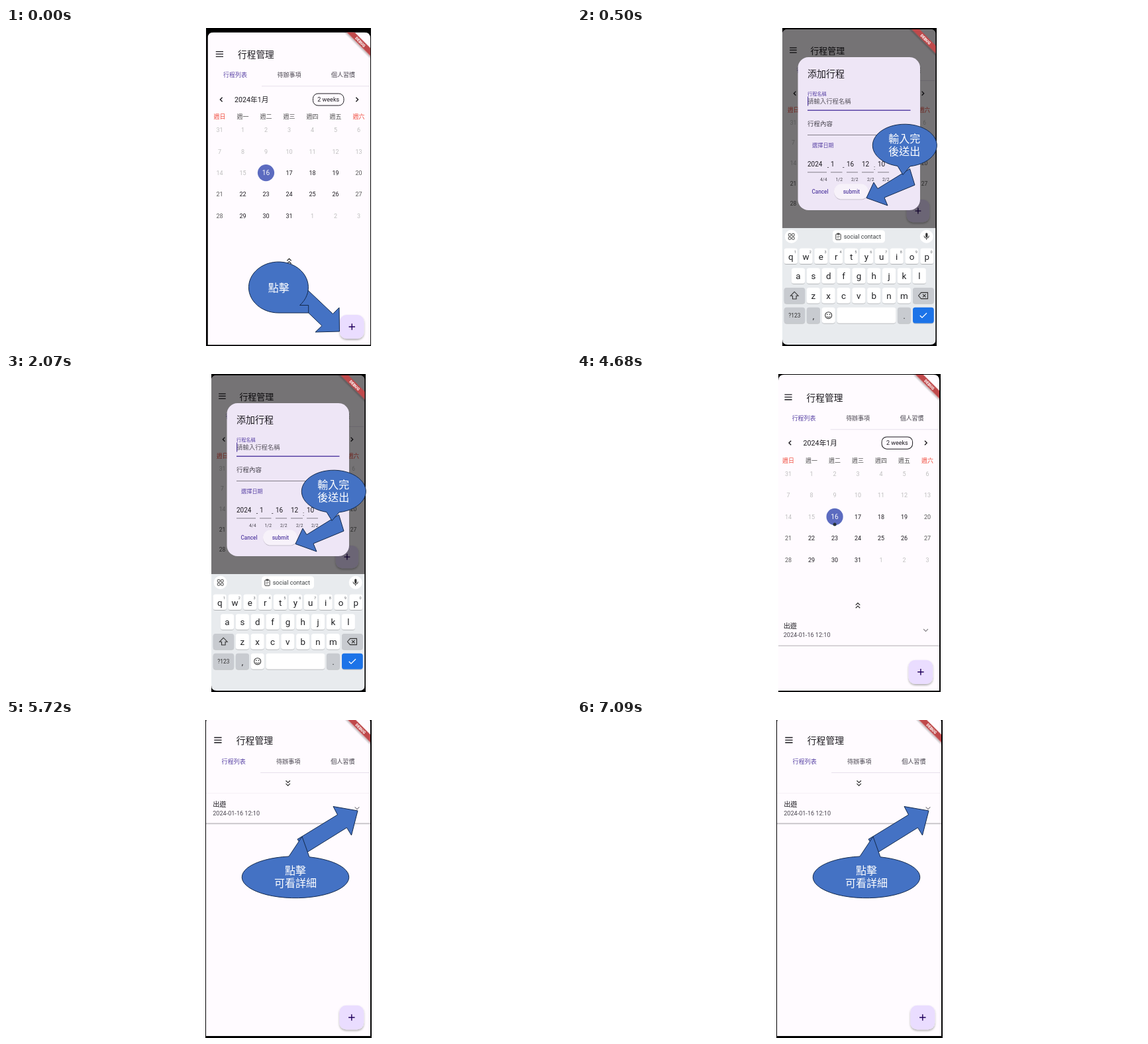
An HTML page that plays this animation: 853x480 px, repeating every 8 s.

```html
<!DOCTYPE html>
<html lang="zh-Hant">
<head>
<meta charset="utf-8">
<title>行程管理</title>
<style>
html, body { margin: 0; width: 100%; height: 100%; overflow: hidden; background: #fff; }
svg { display: block; width: 100%; height: 100%; font-family: Roboto, "Noto Sans CJK TC", "Noto Sans CJK JP", "Noto Sans CJK", sans-serif; }
.m { text-anchor: middle; }
.e { text-anchor: end; }
.call { fill: #4472c4; stroke: #142a4d; stroke-width: 1; }
</style>
</head>
<body>
<svg id="stage" viewBox="0 0 853 480">
  <defs>
    <filter id="soft" x="-30%" y="-30%" width="160%" height="170%">
      <feDropShadow dx="0" dy="1.8" stdDeviation="1.6" flood-opacity=".32"/>
    </filter>
    <filter id="thin" x="-10%" y="-10%" width="120%" height="130%">
      <feDropShadow dx="0" dy=".8" stdDeviation=".4" flood-opacity=".3"/>
    </filter>
  </defs>
</svg>
<script>
const INK = '#1d1b20', VIOLET = '#5b45a6', PAPER = '#fffbff', LOOP = 8000;

// Drawing helpers; text is centred vertically on y
const text = (x, y, s, size, fill = INK, cls = '', more = '') =>
  `<text x="${x}" y="${y + size * 0.37}" font-size="${size}" fill="${fill}" class="${cls}" ${more}>${s}</text>`;
const mid = (x, y, s, size, fill, more) => text(x, y, s, size, fill, 'm', more);
const box = (x, y, w, h, r, fill, more = '') =>
  `<rect x="${x}" y="${y}" width="${w}" height="${h}" rx="${r}" fill="${fill}" ${more}/>`;
const line = (d, color = INK, w = 1.3, more = '') =>
  `<path d="${d}" fill="none" stroke="${color}" stroke-width="${w}" ${more}/>`;
const rule = (x1, x2, y, color, w = 1) => line(`M${x1} ${y}H${x2}`, color, w);
const call = d => `<path class="call" d="${d}"/>`;
const chevron = (x, y, dir, color = INK) =>
  line(`M${x - dir * 1.6} ${y - 3.2}l${dir * 3.2} 3.2l${-dir * 3.2} 3.2`, color, 1.4);
const fold = (x, y, dir, color = '#333', r = 3.2, w = 1.3) =>
  line(`M${x - r} ${y + dir * r / 2}l${r} ${-dir * r}l${r} ${dir * r}`, color, w);
const folds = (x, y, dir) => fold(x, y - 2.2, dir) + fold(x, y + 2.2, dir);

function header() {
  const tabs = ['行程列表', '待辦事項', '個人習慣'];
  return [35.6, 39.4, 43.2].map(y => rule(316.8, 328, y, INK, 1.3)).join('') +
    text(350, 40, '行程管理', 13.7) +
    tabs.map((s, i) => mid(346 + i * 81.5, 71, s, 9, i ? '#49454f' : VIOLET)).join('') +
    rule(386, 549, 87.8, '#e7e0ec');
}

function calendar(marked) {
  let s = chevron(325, 108, -1) + text(345, 108, '2024年1月', 10.7) +
    box(463.5, 99, 46.5, 18, 7.5, 'none', `stroke="${INK}"`) +
    mid(486.7, 108, '2 weeks', 9) + chevron(530, 108, 1);
  for (let c = 0; c < 7; c++) {
    const x = 322.5 + c * 35, weekend = c % 6 === 0;
    s += mid(x, 134, '週' + '日一二三四五六'[c], 9, weekend ? '#f04a3c' : '#4f4f4f');
    for (let r = 0; r < 5; r++) {
      const n = r * 7 + c, y = 154 + r * 32.3;
      const day = n === 0 ? 31 : n > 31 ? n - 31 : n;
      if (n === 16) {
        s += `<circle cx="${x}" cy="${y}" r="12.6" fill="#5c6bc0"/>` + mid(x, y, day, 10.2, '#fafafa');
        if (marked) s += `<circle cx="${x}" cy="${y + 11.4}" r="2.5" fill="#263238"/>`;
      } else {
        s += mid(x, y, day, 9, n < 16 || n > 31 ? '#bfbfbf' : weekend ? '#5a5a5a' : INK);
      }
    }
  }
  return s;
}

const fab = y => box(504, y - 18, 36.5, 36, 10, '#eaddff', 'filter="url(#soft)"') +
  line(`M517.6 ${y}h9.4m-4.7 -4.7v9.4`, '#21005d', 1.4);

const banner = (x, y) => `<g transform="translate(${x} ${y}) rotate(45)">` +
  box(-30, 17.1, 60, 8.3, 0, '#c04a4c', 'filter="url(#soft)"') +
  mid(0, 21.2, 'DEBUG', 6, '#fff', 'font-weight="800"') + '</g>';

// Black surround with the screen clipped to its rounded outline
function phone(id, [bx, bw], [x, y, w, h, r], content) {
  return box(bx, 0, bw, 480, 0, '#000') +
    `<clipPath id="${id}"><path d="M${x} ${y + h}V${y + r}q0 ${-r} ${r} ${-r}h${w - 2 * r}q${r} 0 ${r} ${r}v${h - r}z"/></clipPath>` +
    `<g clip-path="url(#${id})">${box(x, y, w, h, 0, PAPER)}${content}</g>`;
}
const fit = (m, s) => `<g transform="matrix(${m})">${s}</g>`;

const entry = (x, y, cx) => text(x, y, '出遊', 10.2) +
  text(x, y + 13.3, '2024-01-16 12:10', 9.1, '#49454f') + fold(cx, y + 6, -1, '#8a878c', 3.4, 1.2);

function dialog() {
  const fields = [[348, 377, '2024', '4/4'], [383, 400.5, '1', '1/2'], [407, 424, '16', '2/2'],
    [430, 448, '12', '2/2'], [454, 471, '10', '2/2']];
  return box(333.5, 44, 184.5, 231, 16, '#eee6f6') +
    text(348, 69, '添加行程', 14) +
    text(348, 99.5, '行程名稱', 7.2, VIOLET) +
    text(348, 111, '請輸入行程名稱', 9.4, '#5d5963') +
    line('M348.6 103.5v14', VIOLET, 1.2) + rule(348, 503.5, 124.2, VIOLET, 1.4) +
    text(348, 144, '行程內容', 9.5, '#49454f') + rule(348, 503.5, 161.5, '#79747e', .9) +
    text(355, 177, '選擇日期', 8.2, VIOLET) +
    fields.map(([a, b, v, n]) => text(a, 205, v, 10) + rule(a, b, 217.8, '#79747e', .9) +
      text(b + .5, 228, n, 6.8, '#49454f', 'e')).join('') +
    mid(379, 210, '-', 9) + mid(402.3, 210, '-', 9) + mid(449, 211, ':', 9) +
    text(354.5, 246.8, 'Cancel', 8.2, VIOLET, '', 'font-weight="500"') +
    box(388, 235.3, 52, 23, 11.5, '#f7f2fa', 'filter="url(#thin)"') +
    mid(414.3, 246.8, 'submit', 8.2, VIOLET, 'font-weight="500"');
}

function keyboard() {
  const key = (x, y, w, fill = '#fff') => box(x, y, w, 23.6, 3.6, fill, 'filter="url(#thin)"');
  const GREY = '#c8cbd0', STEP = 22.85, DARK = '#202124';
  const rows = [['qwertyuiop', 322.7, 332.5], ['asdfghjkl', 334, 362.2], ['zxcvbnm', 356.8, 392]];
  let s = '<path d="M310 302H541.5V470q0 8 -8 8H318q-8 0 -8 -8z" fill="#e8ebee"/>' +
    '<circle cx="323.7" cy="314.8" r="10" fill="#fff"/><circle cx="527.7" cy="314.8" r="10" fill="#fff"/>' +
    box(386, 305.3, 79, 19, 4.5, '#fff') + text(402.7, 314.8, 'social contact', 9, '#3c4043');
  for (const i of [0, 1, 2, 3])
    s += box(319.3 + i % 2 * 5.2, 310.4 + (i >> 1) * 5.2, 3.6, 3.6, .8, 'none', 'stroke="#444" stroke-width="1"');
  s += box(390.8, 311, 7.4, 8.6, 1, 'none', 'stroke="#444"') + box(392.6, 309.6, 3.8, 2.6, .6, '#444') +
    line('M392.6 314.4h4m-4 2.4h2.8', '#444', .8) +
    box(526.2, 309.2, 3.2, 6.8, 1.6, '#333') + line('M524 313.6a3.7 3.7 0 0 0 7.4 0M527.7 317.3v2.4', '#333', 1);
  rows.forEach(([letters, x0, y], r) => [...letters].forEach((ch, i) => {
    const x = x0 + i * STEP;
    s += key(x - 10.1, y, 20.2) + mid(x, y + 12.2, ch, 13.4, DARK);
    if (!r) s += mid(x + 6.8, y + 5, (i + 1) % 10, 5.6, '#5f6368');
  }));
  s += key(312.7, 392, 31.5, GREY) + key(507, 392, 31.7, GREY) +
    line('M328.3 398.2l-5.8 6h3v4.8h5.6v-4.8h3z', '#333', 1.1) +
    line('M515.5 404l4 -4.6h10v9.2h-10zM522 401.8l4.6 4.6m0 -4.6l-4.6 4.6', '#333', 1.1);
  s += key(312.7, 421.8, 31.5, GREY) + mid(328.4, 434, '?123', 8.4, '#333') +
    key(346.8, 421.8, 20.2, GREY) + mid(356.9, 435, ',', 12, DARK) +
    key(369.6, 421.8, 20.2) + key(392.4, 421.8, 89) +
    key(483.9, 421.8, 20.2, GREY) + mid(494, 435, '.', 12, DARK) +
    key(507, 421.8, 31.7, '#1a73e8') + line('M517.8 434l3.2 3.2l7 -7', '#fff', 1.3);
  return s + '<circle cx="379.7" cy="433.7" r="5" fill="none" stroke="#333" stroke-width="1.1"/>' +
    '<circle cx="377.9" cy="432.4" r=".8" fill="#333"/><circle cx="381.5" cy="432.4" r=".8" fill="#333"/>' +
    line('M377 435a2.9 2.9 0 0 0 5.4 0', '#333', 1);
}

const note = (x, y, s) => mid(x, y, s, 16, '#fff', 'font-weight="300"');

// Ellipse with a pointed tail between the edge points at x1 and x2; side is -1 for top, 1 for bottom
function bubble(cx, cy, rx, ry, x1, x2, tip, side) {
  const edge = x => `${x} ${cy + side * ry * Math.sqrt(1 - ((x - cx) / rx) ** 2)}`;
  return call(`M${edge(x1)}L${tip}L${edge(x2)}A${rx} ${ry} 0 1 ${side < 0 ? 1 : 0} ${edge(x1)}Z`);
}

const scenes = [
  [0, phone('p0', [302, 249], [304.5, 6.5, 245.5, 472, 9],
    header() + calendar() + folds(427.5, 352, 1) + fab(451) + banner(550, 6)) +
    call('M440 381L456 396L493.5 431.5L503 422L503.5 458L467 459L477 449.5L440 414Z') +
    call('M412 430A45 38.5 0 1 1 443.5 418.5H456.7V430Z') + note(411.8, 392, '點擊')],
  [500, phone('p1', [310, 233], [310, 2, 231.5, 476, 8],
    fit('.943 0 0 .9506 22.4 -4', header() + calendar() + fab(294.6)) +
    box(310, 0, 233, 480, 0, 'rgba(0,0,0,.54)') + banner(541.3, 2) + dialog() +
    box(310, 302, 233, 178, 0, '#000') + keyboard()) +
    call('M437 256.5L448 233L454 242.5L502.5 212.5L510 237L464 256L469 268Z') +
    bubble(494.8, 177.2, 48.5, 32, 484, 503, '492 221.5', 1) +
    note(494.2, 167.5, '輸入完') + note(494.2, 186.5, '後送出')],
  [3110, phone('p2', [304, 245], [304, 1, 243, 477, 9],
    fit('1 0 0 1.008 -3.4 -4.8', header() + calendar(true) + fab(451)) +
    folds(424, 349.5, 1) + entry(311.7, 380.7, 526.5) +
    rule(304, 547, 410.2, '#cbc8cc', 1.6) + banner(547, 1))],
  [5720, phone('p3', [301, 251], [302, -4, 248, 481, 8],
    fit('1.01 0 0 1.017 -5.7 -9.7', header() + fab(451)) +
    folds(425.7, 95.3, -1) + rule(302, 550, 110.5, '#f6f1f7') +
    entry(312.2, 127, 530) + rule(302, 550, 156.4, '#c4c1c5', 1.6) + banner(550.3, -2)) +
    call('M440 180L500.5 143L494 130.5L531 137L521.5 174L514.5 162.5L454 200Z') +
    bubble(437, 237.2, 80.8, 31.5, 427, 458, '447 176', -1) +
    note(437, 227.5, '點擊') + note(437, 246.5, '可看詳細')]
];

const stage = document.getElementById('stage');
stage.insertAdjacentHTML('beforeend', scenes.map(s => `<g>${s[1]}</g>`).join(''));
const groups = stage.querySelectorAll(':scope > g');
const start = performance.now();

function draw() {
  const t = (performance.now() - start) % LOOP;
  const now = scenes.findLastIndex(s => s[0] <= t);
  groups.forEach((g, i) => { g.style.visibility = i === now ? 'visible' : 'hidden'; });
  requestAnimationFrame(draw);
}
draw();
</script>
</body>
</html>
```
